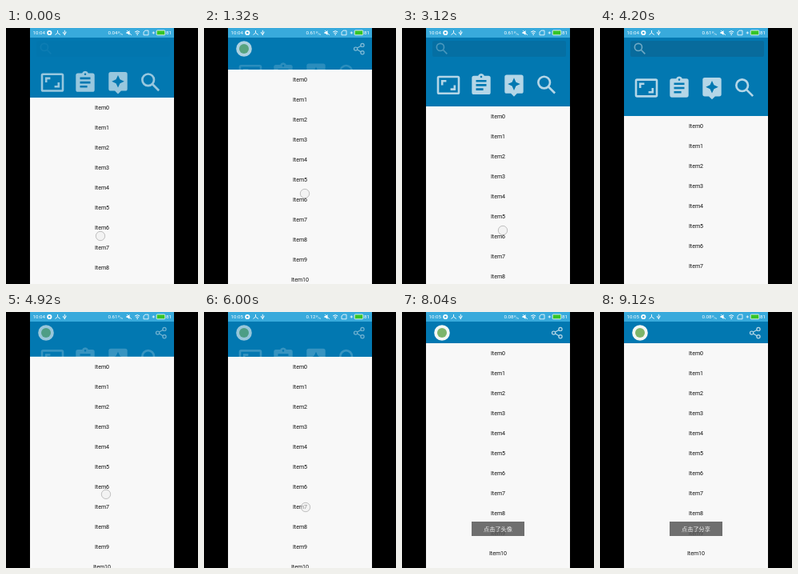
These frames come from a looping animation (240 px wide and 320 px high, 9.24 s). An HTML page:

```html
<!DOCTYPE html>
<html lang="en">
<head>
<meta charset="utf-8">
<title>Collapsing header</title>
<style>
  html, body { margin: 0; width: 100%; height: 100%; overflow: hidden; background: #000; }
  svg { display: block; width: 100%; height: 100%; }
  text { font-family: Roboto, "Noto Sans CJK SC", "Noto Sans CJK", sans-serif; }
  .status text { font-size: 6.2px; fill: #fff; }
  .line { fill: none; stroke: currentColor; }
  #list text { font-size: 7.1px; fill: #111; text-anchor: middle; }
</style>
</head>
<body>
<svg viewBox="0 0 240 320">
  <defs>
    <clipPath id="screen"><rect x="30" width="180" height="320"/></clipPath>
    <g id="magnifier" class="line" stroke-width="2">
      <circle cx="-2.5" cy="-2.5" r="5.5"/>
      <path d="M1.8 1.8L7.6 7.6"/>
    </g>
  </defs>
  <g clip-path="url(#screen)">
    <rect x="30" width="180" height="320" fill="#0278b1"/>

    <g id="search">
      <rect x="38" y="16" width="167" height="20" rx="2" fill="#086b9c"/>
      <use href="#magnifier" transform="translate(50 26) scale(.83)" color="#6fa9c4"/>
    </g>

    <g id="menu" color="#ecf4f8" fill="#ecf4f8">
      <g transform="translate(58) scale(1.3)">
        <rect class="line" x="-10" y="-8" width="20" height="16" rx="1" stroke-width="2"/>
        <path class="line" stroke-width="2" d="M-6 0V-4H-2M6 0V4H2"/>
      </g>
      <path transform="translate(99) scale(1.3)" fill-rule="evenodd"
        d="M-7-9H-3A3.2 3.2 0 0 1 3-9H7Q9-9 9-7V7Q9 9 7 9H-7Q-9 9-9 7V-7Q-9-9-7-9Z
           M-1-8a1 1 0 1 0 2 0a1 1 0 1 0-2 0ZM-5-5H5v2H-5ZM-5-1H5v2H-5ZM-5 3H2v2H-5Z"/>
      <path transform="translate(140) scale(1.3)" fill-rule="evenodd"
        d="M-7-10H7Q9-10 9-8V6Q9 8 7 8H3L0 11L-3 8H-7Q-9 8-9 6V-8Q-9-10-7-10Z
           M0-7L1.9-2.9L6-1L1.9.9L0 5L-1.9.9L-6-1L-1.9-2.9Z"/>
      <use href="#magnifier" transform="translate(181) scale(1.33)"/>
    </g>

    <g id="toolbar">
      <circle cx="50" cy="26" r="9.8" fill="#f4f7f4"/>
      <circle cx="50" cy="26" r="6" fill="#7db56b"/>
      <g class="line" color="#b9d8e6" stroke-width="1.2">
        <path d="M191.6 25.1L196.4 22.3M191.6 27.1L196.4 30"/>
        <circle cx="189.6" cy="26.1" r="2.1"/>
        <circle cx="198" cy="21.4" r="2.1"/>
        <circle cx="198" cy="30.8" r="2.1"/>
      </g>
    </g>

    <g id="list"><rect x="30" width="180" height="320" fill="#f8f8f8"/></g>

    <g class="status" color="#fff">
      <rect x="30" width="180" height="12" fill="#38aadc"/>
      <text id="clock" x="33.5" y="8.2"></text>
      <circle class="line" cx="54.3" cy="6" r="2.2" stroke-width="1.8"/>
      <path class="line" d="M64.5 3V6L61.5 8.5M64.5 6L67.8 8.5M73.3 2.8V9.2M71.5 5V6.5L73.3 8L75 6V4.5" stroke-width=".9"/>
      <text id="rate" x="127.5" y="8.2"></text>
      <text x="140.3" y="6.5" style="font-size:3.8px">K</text>
      <text x="142.5" y="8.6" style="font-size:3.8px">/s</text>
      <path d="M150.5 5H152L154.5 3V9L152 7H150.5Z" fill="#fff"/>
      <path class="line" d="M151 3L157 9" stroke-width=".8"/>
      <path class="line" d="M161.2 5Q164.2 2.4 167.2 5M162.5 6.7Q164.2 5.3 165.9 6.7" stroke-width="1"/>
      <circle cx="164.2" cy="8.3" r=".8" fill="#fff"/>
      <path class="line" d="M172 5L174 3.2H178V8.8H172Z" stroke-width=".8"/>
      <path class="line" d="M182.7 6H186M184.3 4.4V7.6" stroke-width=".8"/>
      <rect x="188.2" y="3" width="10.6" height="5.8" rx="1" fill="#35c428" stroke="#fff" stroke-width=".8"/>
      <text x="200" y="8.2">81</text>
    </g>

    <g id="toast">
      <rect x="87" y="262" width="66" height="18" fill="#585858" opacity=".85"/>
      <text id="message" x="120" y="273.7" text-anchor="middle" font-size="7.2" fill="#eee"></text>
    </g>
    <circle id="touch" r="5.7" fill="#eee" fill-opacity=".55" stroke="#aaa" stroke-width=".7"/>
  </g>
</svg>
<script>
const LOOP = 9240, STEP = 120, COLLAPSED = 39, EXPANDED = 110;
const $ = id => document.getElementById(id);
const clamp = v => Math.max(0, Math.min(1, v));

// [time, top edge of the list]
const listPath = [
  [0, 87], [720, 45], [960, 39], [1200, 39], [1320, 52], [3120, 98], [3500, 106],
  [4200, 110], [4320, 110], [5040, 45], [5280, 39], [5520, 39], [6000, 56],
  [6360, 80], [6600, 80], [7080, 41], [7200, 39], [LOOP, 39]
];
// The finger keeps a constant distance from the list edge while dragging.
const drags = [
  { from: 0, to: 840, x: 118, grip: 173 },
  { from: 1200, to: 3360, x: 126, grip: 155 },
  { from: 4320, to: 5160, x: 125, grip: 172 },
  { from: 5520, to: 6480, x: 127, grip: 188 }
];
const taps = [
  { from: 7440, to: 7680, x: 46, y: 27 },
  { from: 8160, to: 8400, x: 196, y: 27 }
];

for (let i = 0; i < 13; i++) {
  const label = document.createElementNS("http://www.w3.org/2000/svg", "text");
  label.textContent = "Item" + i;
  label.setAttribute("x", 120);
  label.setAttribute("y", 15.2 + i * 25);
  $("list").append(label);
}

function listTop(t) {
  const i = listPath.findIndex(([time]) => time > t);
  const [t0, a] = listPath[i - 1], [t1, b] = listPath[i];
  return a + (b - a) * (t - t0) / (t1 - t0);
}

function draw(t) {
  const top = listTop(t);
  const open = (top - COLLAPSED) / (EXPANDED - COLLAPSED);
  const moveY = (id, y) => $(id).setAttribute("transform", `translate(0 ${y})`);
  const fade = (id, alpha) => $(id).setAttribute("opacity", clamp(alpha));

  moveY("list", top);
  moveY("menu", 75 - 0.3 * (EXPANDED - top));
  fade("menu", Math.min(0.76, open * 0.95));
  fade("search", (top - 85) / 20);
  fade("toolbar", 1 - open * 1.6);

  const active = g => t >= g.from && t < g.to;
  const finger = drags.find(active) || taps.find(active);
  fade("touch", finger ? 1 : 0);
  if (finger) {
    $("touch").setAttribute("cx", finger.x);
    $("touch").setAttribute("cy", finger.y ?? top + finger.grip);
  }

  const shared = t >= 8400;
  $("message").textContent = shared ? "点击了分享" : "点击了头像";
  fade("toast", (t - (shared ? 8340 : 7620)) / 300);
  $("clock").textContent = t < 5040 ? "10:04" : "10:05";
  $("rate").textContent = t < 1200 ? "0.04" : t < 5040 ? "0.61" : t < 8040 ? "0.12" : "0.08";
}

const start = performance.now();
function tick() {
  const t = (performance.now() - start) % LOOP;
  draw(Math.floor(t / STEP) * STEP);
  requestAnimationFrame(tick);
}
tick();
</script>
</body>
</html>
```
